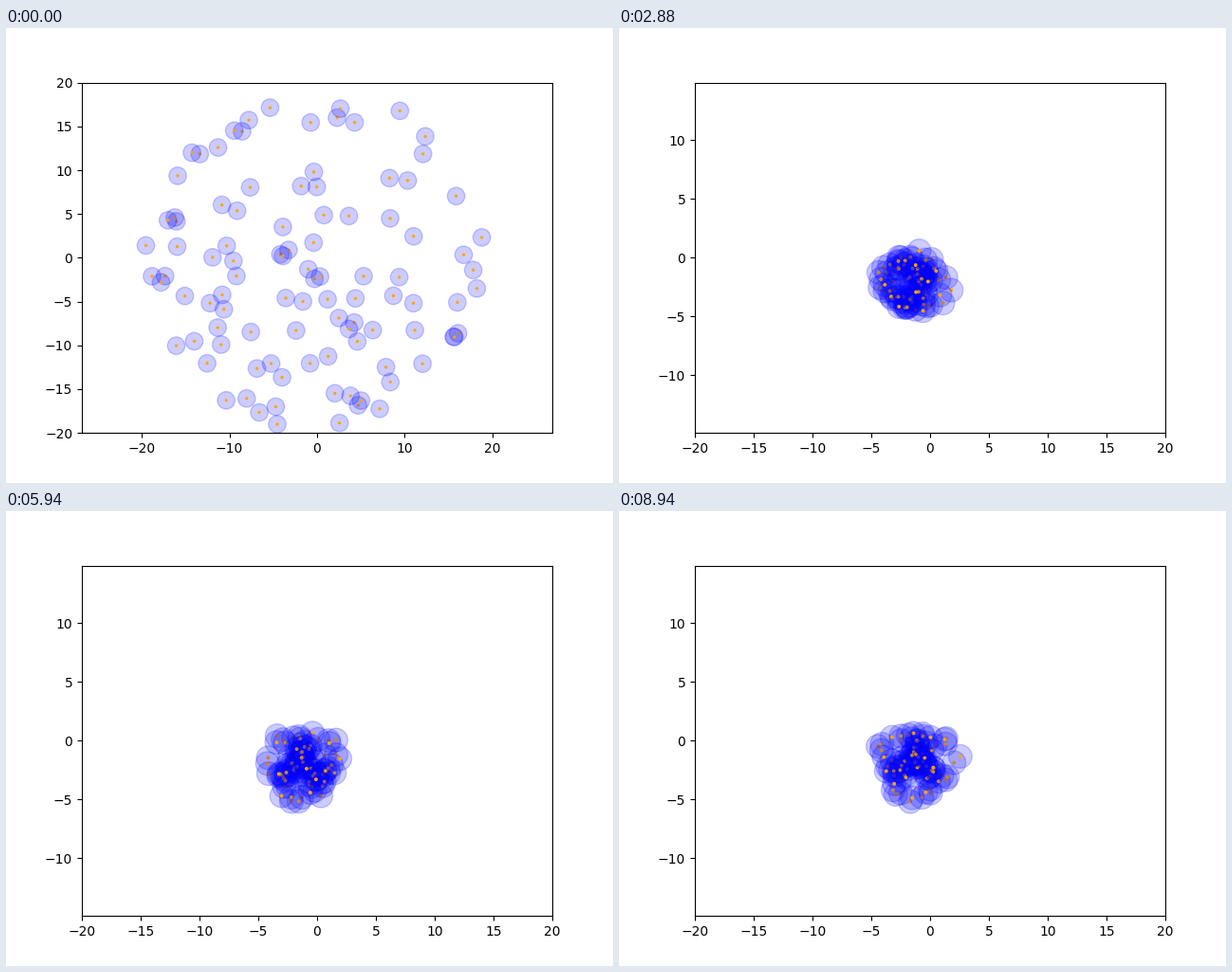
A matplotlib script for the animation above (9000 ms loop, 640 px wide and 480 px high).

```python
import numpy as np
import matplotlib.pyplot as plt
from matplotlib.animation import FuncAnimation
from matplotlib.collections import EllipseCollection

FRAMES, STEP_MS = 150, 60
ZOOM_FRAME = 15          # the axes switch to the tighter view here
CELLS, RADIUS, SPACING = 100, 19.6, 1.7
PULL, PUSH, REACH, MAX_STEP = 0.073, 0.85, 1.4, 1.1
RATIO = 496 / 369.6      # width to height of the axes

# Spots where a few cells start close together.
CLUMPS = [(-12.8, 12), (-8, 14.3), (4, 15), (-3.6, 1), (-1, -0.5), (-17.5, -3),
          (-11.5, -5), (16.3, -8.5), (4.5, -7.8), (5, -17), (-17, 4)]


def start_positions(rng):
    """Three cells around each clump, the rest spread over a disc."""
    cells = [np.add(spot, rng.normal(0, 0.9, 2)) for spot in CLUMPS for _ in range(3)]
    while len(cells) < CELLS:
        r, turn = RADIUS * np.sqrt(rng.random()), rng.uniform(0, 2 * np.pi)
        spot = r * np.array([np.cos(turn), np.sin(turn)])
        if np.linalg.norm(np.array(cells) - spot, axis=1).min() > SPACING:
            cells.append(spot)
    return rng.permutation(np.array(cells))


def advance(pos):
    """Every cell is drawn to all others and pushed off by close ones."""
    diff = pos[None, :, :] - pos[:, None, :]
    dist = np.linalg.norm(diff, axis=2)
    pull = PULL / (dist ** 2 + 0.1)
    push = PUSH * np.clip(1 - dist / REACH, 0, None) / np.maximum(dist, 1e-6)
    move = ((pull - push)[..., None] * diff).sum(axis=1)
    size = np.linalg.norm(move, axis=1, keepdims=True)
    return pos + move * np.minimum(1, MAX_STEP / np.maximum(size, 1e-9))


path = [start_positions(np.random.default_rng(4))]
for _ in range(FRAMES - 1):
    path.append(advance(path[-1]))

fig, ax = plt.subplots(figsize=(6.4, 4.8), dpi=100)

# Each cell's disc is followed by its own dot, so later discs cover it.
width = np.tile([2.0, 0.2], CELLS)
colors = [(0, 0, 1, 0.2), "orange"] * CELLS
discs = EllipseCollection(
    width, width, np.zeros(2 * CELLS), units="xy",
    offsets=np.repeat(path[0], 2, axis=0), offset_transform=ax.transData,
    facecolors=colors, edgecolors=colors, linewidths=1, zorder=1)
ax.add_collection(discs, autolim=False)


def draw(frame):
    half_x, half_y = (20 * RATIO, 20) if frame < ZOOM_FRAME else (20, 20 / RATIO)
    ax.set_xlim(-half_x, half_x)
    ax.set_ylim(-half_y, half_y)
    discs.set_offsets(np.repeat(path[frame], 2, axis=0))
    return [discs]


anim = FuncAnimation(fig, draw, frames=FRAMES, init_func=lambda: draw(0),
                     interval=STEP_MS, repeat=True, repeat_delay=0, blit=False)
plt.show()
```
